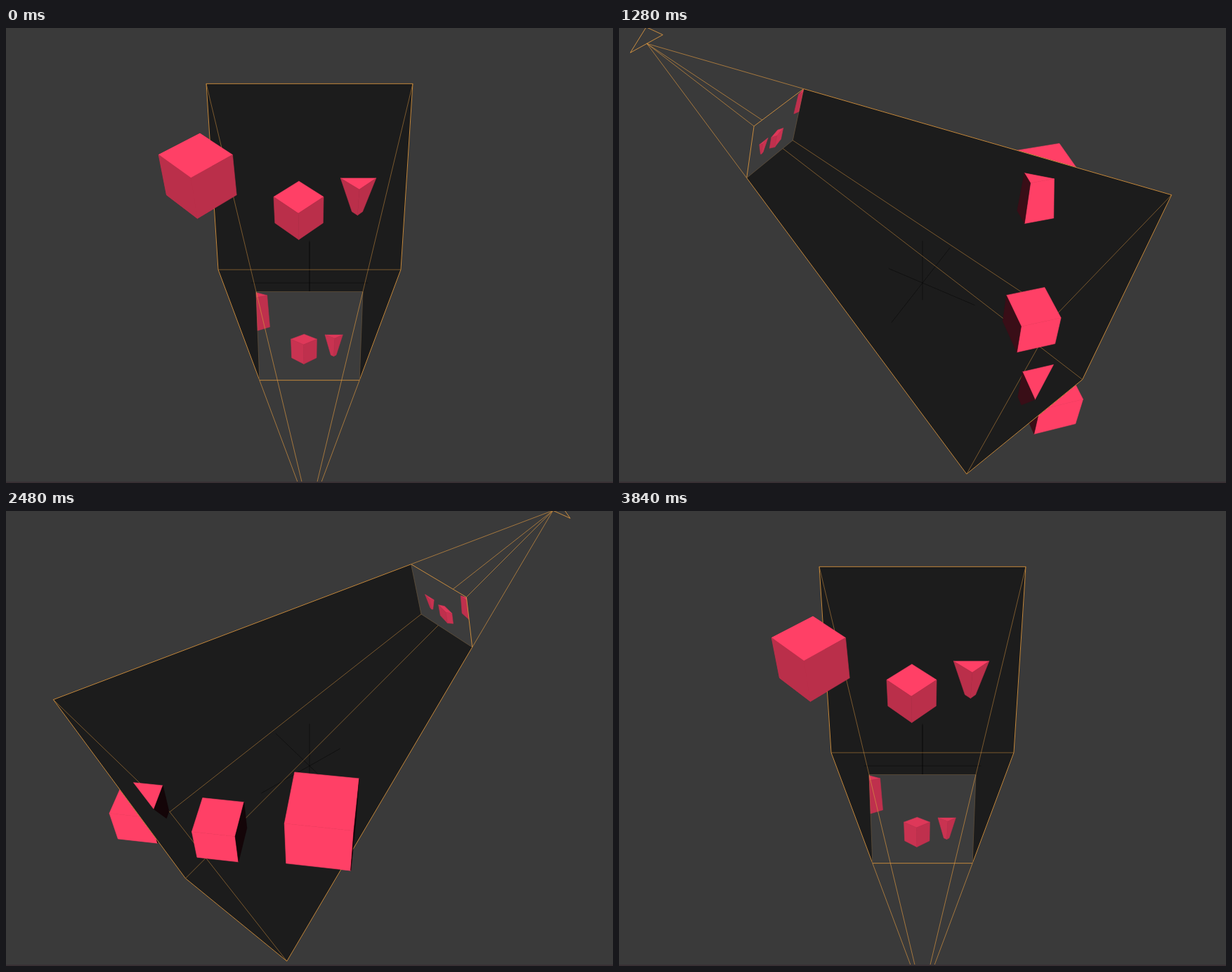
These frames come from a looping animation (864 px wide and 648 px high, 3.88 s). An HTML page with a canvas:

```html
<!DOCTYPE html>
<html>
<head>
<meta charset="utf-8">
<style>
  html, body { margin: 0; width: 100%; height: 100%; overflow: hidden; background: #3a3a3a; }
  canvas { display: block; }
</style>
</head>
<body>
<canvas id="stage" width="864" height="648"></canvas>
<script>
const ctx = document.getElementById('stage').getContext('2d');
const LOOP = 3880, STEP = 40, TURN_STEPS = 96;

// Vector helpers
const sub = (a, b) => a.map((v, i) => v - b[i]);
const mix = (a, b, t) => a.map((v, i) => v + (b[i] - v) * t);
const dot = (a, b) => a[0] * b[0] + a[1] * b[1] + a[2] * b[2];
const cross = (a, b) => [
  a[1] * b[2] - a[2] * b[1], a[2] * b[0] - a[0] * b[2], a[0] * b[1] - a[1] * b[0]];

// Camera frustum: corners run top left, top right, bottom right, bottom left
const apex = [0, -0.533, 0.302];
const W = 0.19122;
const far = [[-W, 0.3237, 0.1924], [W, 0.3237, 0.1924], [W, 0.1923, -0.1689], [-W, 0.1923, -0.1689]];
const near = far.map(p => mix(apex, p, 0.321));
const nearMid = mix(near[0], near[2], 0.5);
const centre = mix(nearMid, mix(far[0], far[2], 0.5), 0.5);

// Signed plane function, positive inside the frustum
function planeOf([a, b, c]) {
  const n = cross(sub(b, a), sub(c, a));
  const sign = Math.sign(dot(n, sub(centre, a)));
  return p => sign * dot(n, sub(p, a));
}
const next = i => (i + 1) % 4;
const walls = near.map((p, i) => [p, near[next(i)], far[next(i)], far[i]]);
const faces = [...walls, far];
const wallPlanes = walls.map(planeOf);
const nearPlane = planeOf(near), farPlane = planeOf(far);
const solidPlanes = [...wallPlanes, farPlane];

// Upright cube turned by 45 degrees: centre of the top and half diagonal
function makeCube(x, y, z, r) {
  const ring = h => [[x + r, y, h], [x, y + r, h], [x - r, y, h], [x, y - r, h]];
  const top = ring(z), base = ring(z - r * Math.SQRT2);
  const sides = top.map((p, i) => {
    const a = Math.PI / 4 + i * Math.PI / 2;
    return { pts: [p, top[next(i)], base[next(i)], base[i]], n: [Math.cos(a), Math.sin(a), 0] };
  });
  return { mid: [x, y, z - r * 0.7], faces: [{ pts: top, n: [0, 0, 1] }, ...sides] };
}
const cubes = [
  makeCube(-0.188, 0.1225, 0.1791, 0.061),
  makeCube(-0.0205, 0.1919, 0.0301, 0.047),
  makeCube(0.0961, 0.2731, 0.0199, 0.047)];

const facing = (face, from) => dot(face.n, sub(from, face.pts[0])) > 0;

function clip(pts, planes) {
  for (const plane of planes) {
    const out = [];
    pts.forEach((p, i) => {
      const q = pts[(i + 1) % pts.length], a = plane(p), b = plane(q);
      if (a >= 0) out.push(p);
      if (a * b < 0) out.push(mix(p, q, a / (a - b)));
    });
    pts = out;
  }
  return pts;
}

// The small camera takes a 4:3 picture, stretched over its square near plane
function toPicture(p) {
  const a = nearPlane(apex), b = nearPlane(p);
  const [x, y, z] = sub(mix(apex, p, a / (a - b)), nearMid);
  return [nearMid[0] + x * 0.9375, nearMid[1] + y * 1.25, nearMid[2] + z * 1.25];
}
const picture = cubes.flatMap(cube => cube.faces
  .filter(f => facing(f, apex))
  .map(f => ({
    shade: f.n[2] ? 0.87 : f.n[0] < 0 ? 0.79 : 0.75,
    pts: clip(clip(f.pts, [farPlane]).map(toPicture), wallPlanes)
  })));

let sin, cos, eye;

function project([x, y, z]) {
  const px = x * cos + y * sin, py = y * cos - x * sin;
  const depth = 1.1353 + 0.7109 * py - 0.7033 * z;
  return [432 + 945.5 * px / depth, -619 + (1114.9 - 1330 * z) / depth];
}

function trace(pts) {
  ctx.beginPath();
  pts.forEach(p => ctx.lineTo(...project(p)));
}

function fill(pts, color) {
  if (pts.length < 3) return;
  trace(pts);
  ctx.closePath();
  ctx.fillStyle = ctx.strokeStyle = color;
  ctx.lineWidth = 0.6;
  ctx.fill();
  ctx.stroke();
}

function line(pts, color, width = 1) {
  trace(pts);
  ctx.strokeStyle = color;
  ctx.lineWidth = width;
  ctx.stroke();
}

const orange = alpha => `rgba(214,148,64,${alpha})`;
const pink = k => `rgb(${255 * k},${64 * k},${102 * k})`;

function drawCubes(planes) {
  const distance = cube => Math.hypot(...sub(cube.mid, eye));
  for (const cube of [...cubes].sort((a, b) => distance(b) - distance(a))) {
    for (const f of cube.faces) {
      if (!facing(f, eye)) continue;
      const light = 1.13 * (f.n[0] * sin - f.n[1] * cos) - 0.07;
      fill(clip(f.pts, planes), pink(f.n[2] ? 1 : Math.max(0, Math.min(1, light))));
    }
  }
}

function drawAxes() {
  const color = 'rgba(8,8,8,0.55)';
  line([[-0.1, 0, 0], [0.1, 0, 0]], color);
  line([[0, -0.068, 0], [0, 0.1, 0]], color);
  line([[0, 0, -0.044], [0, 0, 0.1]], color);
}

// Outline edges, between a wall seen from inside and one seen from outside, are brighter
function drawEdge(p, q, a, b, dim) {
  const outline = a(eye) > 0 !== b(eye) > 0;
  line([p, q], orange(outline ? 0.9 : dim));
}

function drawFrustumEdges() {
  for (let i = 0; i < 4; i++) {
    drawEdge(near[i], far[i], wallPlanes[i], wallPlanes[(i + 3) % 4], 0.5);
    drawEdge(far[i], far[next(i)], wallPlanes[i], farPlane, 0.5);
  }
}

function drawPicture() {
  fill(near, '#3c3c3c');
  picture.forEach(f => fill(f.pts, pink(f.shade)));
  near.forEach((p, i) => drawEdge(p, near[next(i)], wallPlanes[i], nearPlane, 0.2));
}

function drawSight() {
  near.forEach(p => line([apex, p], orange(0.68)));
  const b = 0.036, [x, y, z] = apex;
  const left = [x - b, y, z], right = [x + b, y, z], tip = [x, y + 0.0116, z + 0.032];
  line([left, right, tip, left], orange(0.92));
}

function draw(now) {
  const angle = Math.floor(now % LOOP / STEP) / TURN_STEPS * 2 * Math.PI;
  sin = Math.sin(angle);
  cos = Math.cos(angle);
  eye = [0.7677 * sin, -0.7677 * cos, 0.8383];

  ctx.fillStyle = '#3a3a3a';
  ctx.fillRect(0, 0, 864, 648);

  // Only walls seen from inside are opaque
  const backWalls = solidPlanes.filter(plane => plane(eye) > 0);
  drawCubes([]);
  faces.forEach((pts, i) => solidPlanes[i](eye) > 0 && fill(pts, '#1c1c1c'));
  drawAxes();

  const sightInFront = nearPlane(eye) < 0;
  if (!sightInFront) drawSight();
  drawFrustumEdges();
  drawPicture();
  if (sightInFront) drawSight();
  drawCubes(backWalls);

  ctx.fillStyle = '#383034';
  ctx.fillRect(0, 646, 864, 2);
}

const start = performance.now();
function tick() {
  draw(performance.now() - start);
  requestAnimationFrame(tick);
}
tick();
</script>
</body>
</html>
```
